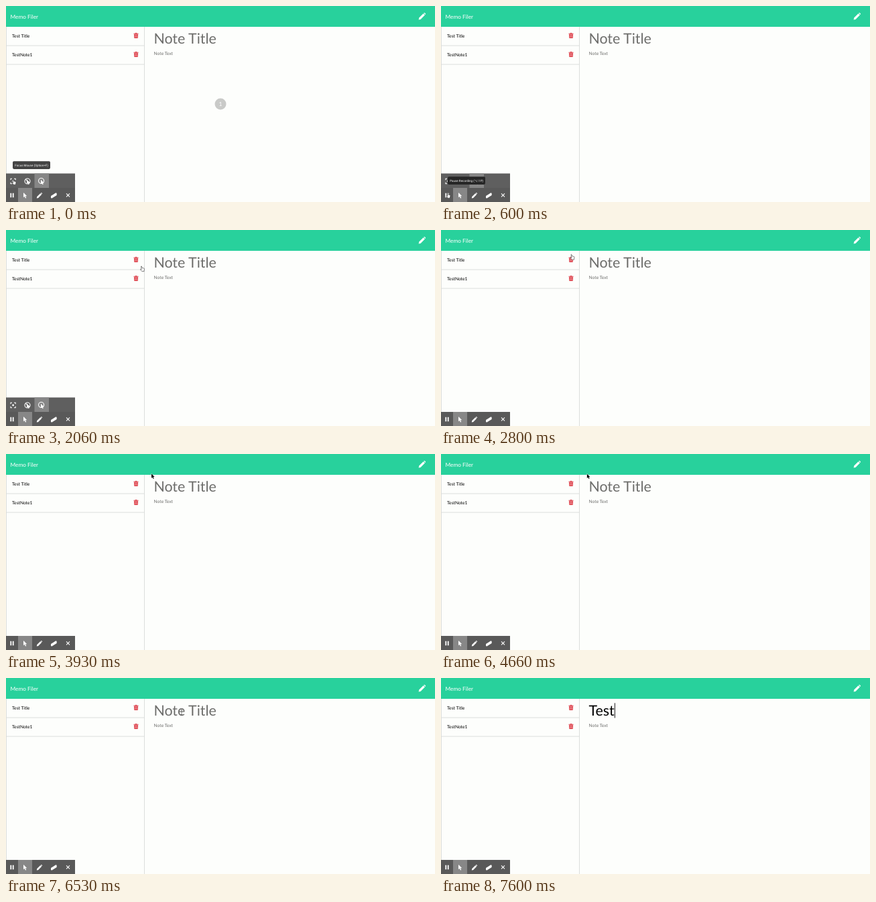
Recreate the animation shown at these times as an HTML page. Size 640 px wide and 292 px high, loop 8 s.

```html
<!DOCTYPE html>
<html lang="en">
<head>
<meta charset="utf-8">
<title>Notes</title>
<style>
  html, body { margin: 0; width: 100%; height: 100%; overflow: hidden; background: #fdfefc; }
  svg { display: block; width: 640px; height: 292px; }
  text { font-family: Lato, sans-serif; font-size: 6.67px; text-rendering: geometricPrecision; white-space: pre; }
  .title { font-size: 21.4px; }
  .hint { fill: #6d6d6b; }
  .tip text { font: 4.5px Roboto, sans-serif; fill: #fff; }
  .line { fill: none; stroke: #fff; stroke-width: 1.1; }
</style>
</head>
<body>
<svg viewBox="0 0 640 292">
  <defs>
    <path id="pencil" d="M0 10.5 .6 7.6 7 1.2 9.3 3.5 2.9 9.9ZM7.6.6 8 .2Q8.6-.2 9.2.3L10.2 1.3Q10.7 1.9 10.2 2.5L9.8 2.9Z"/>
    <path id="arrow" d="M0 0V6.4L1.5 5.1 2.6 7.4 3.7 6.9 2.6 4.6H4.6Z"/>
    <g id="trash" fill="#dc3b45">
      <path d="M0 .8H2L2.4 0H4.6L5 .8H7V1.8H0ZM.4 2.3H6.6L6.2 7.4Q6.1 8 5.5 8H1.5Q.9 8 .8 7.4Z"/>
      <path d="M2.1 3.3V7M3.5 3.3V7M4.9 3.3V7" stroke="#fbd9da" stroke-width=".5"/>
    </g>
  </defs>

  <rect width="640" height="292" fill="#fdfefc"/>
  <path d="M.5 31V292M206.5 31V292M0 59H206M0 87H206" stroke="#dcdedc" fill="none"/>
  <rect width="640" height="31" fill="#28d19c"/>
  <text x="6.5" y="18.7" fill="#fff" style="font-size:8.3px">Memo Filer</text>
  <use href="#pencil" x="615.6" y="10" fill="#fff"/>

  <text x="9" y="47.4">Test Title</text>
  <text x="9" y="75.4">TestNote1</text>
  <use href="#trash" x="190.5" y="40"/>
  <use href="#trash" x="190.5" y="68"/>

  <text id="title" class="title hint" x="220.4" y="56">Note Title</text>
  <text class="hint" x="220.6" y="73.4">Note Text</text>
  <rect id="caret" y="37.3" width=".9" height="22.2"/>

  <g id="count">
    <circle cx="320" cy="146" r="8.5" fill="#c9caC8"/>
    <text x="320" y="149" fill="#fff" text-anchor="middle" style="font-size:8.5px">1</text>
  </g>

  <g id="options">
    <rect y="249.5" width="103" height="22" fill="#5f5f5f"/>
    <rect x="42.5" y="249.5" width="21.5" height="21.5" fill="#868686"/>
    <path class="line" d="M7 259.3V257.3H9M12 257.3H14.2V259.3M14.2 262.7V264.8H12M9 264.8H7V262.7"/>
    <circle cx="10.6" cy="261" r="1.4" fill="#fff"/>
    <circle class="line" cx="32" cy="261" r="4"/>
    <path class="line" d="M29.2 258.2 34.8 263.8"/>
    <use href="#arrow" x="31" y="258.5" fill="#fff"/>
    <circle class="line" cx="52.6" cy="260.5" r="4"/>
    <use href="#arrow" x="52" y="258.8" fill="#fff"/>
  </g>
  <g fill="#fff">
    <rect y="271" width="103" height="21" fill="#595959"/>
    <rect x="18" y="271" width="21" height="21" fill="#878787"/>
    <path d="M6.4 278.8H8.2V285.2H6.4ZM9.8 278.8H11.6V285.2H9.8Z"/>
    <use href="#arrow" transform="translate(26 278) scale(1.15)"/>
    <use href="#pencil" transform="translate(45.8 278) scale(.8)"/>
    <path d="M67 283 74.5 278.3 75.6 279V282L68.3 286.6 67 286Z"/>
    <path class="line" d="M90 279.4 95 284.4M95 279.4 90 284.4"/>
  </g>

  <g id="focusTip" class="tip">
    <rect x="10" y="231.3" width="56" height="11.6" rx="1.8" fill="#434343"/>
    <text x="13.3" y="238.8">Focus Mouse (Option+F)</text>
  </g>
  <g id="pauseTip" class="tip">
    <rect x="10" y="254.3" width="56" height="11.6" rx="1.8" fill="#262626"/>
    <text x="13.3" y="261.8">Pause Recording (⌥⇧P)</text>
  </g>

  <g id="cursor">
    <use id="pointer" href="#arrow" stroke="#fff" stroke-width=".7" paint-order="stroke"/>
    <path id="hand" fill="#fff" stroke="#333" stroke-width=".6" d="M1 .6Q1.6 0 2 .7L2.6 3 5 3.4Q6 3.7 6 4.6L5.5 7V8.2H2.4L.3 5.9Q-.4 5 .2 4.8L1.6 5.4Z"/>
    <path id="beam" fill="none" stroke="#333" stroke-width=".6" d="M-1.5-4Q0-4 0-3V3Q0 4-1.5 4M1.5-4Q0-4 0-3M0 3Q0 4 1.5 4"/>
  </g>
</svg>
<script>
const LOOP = 8000, CLICK = 5630, TYPING = 7060;
const $ = id => document.getElementById(id);
const show = (id, on) => $(id).setAttribute('visibility', on ? 'visible' : 'hidden');

// Mouse stops: time, x, y
const stops = [
  [0, 9, 258], [60, 9, 258], [460, 8, 278], [1200, 8, 278], [1530, 120, 147],
  [1730, 120, 147], [2060, 200.5, 53.5], [2530, 193, 36], [2800, 193, 36],
  [3400, 61, 231], [3600, 61, 231], [3930, 217, 29.5], [4600, 217, 29.5],
  [5400, 267, 37.5], [5460, 267, 37.5], [5800, 262, 51], [LOOP, 262, 51]
];
const keys = [TYPING, 7200, 7400, 7600];

function mouseAt(t) {
  const i = stops.findIndex(s => s[0] > t);
  const [t0, x0, y0] = stops[i - 1], [t1, x1, y1] = stops[i];
  const p = (t - t0) / (t1 - t0), e = p * p * (3 - 2 * p);
  return [x0 + (x1 - x0) * e, y0 + (y1 - y0) * e];
}

function draw(t) {
  const [x, y] = mouseAt(t);
  const beam = t >= CLICK;
  const hand = !beam && (y > 250 || (x < 206 && y > 31 && y < 87));
  $('cursor').setAttribute('transform', `translate(${x} ${y})`);
  show('beam', beam && t < TYPING);
  show('hand', hand);
  show('pointer', !beam && !hand);

  $('count').setAttribute('opacity', Math.max(0, Math.min(1, 1 - (t - 60) / 250)));
  show('focusTip', t < 260);
  show('pauseTip', t >= 460 && t < 860);
  show('options', t < 2800);

  const typed = 'Test'.slice(0, keys.filter(k => t >= k).length);
  const title = $('title');
  title.textContent = typed || 'Note Title';
  title.setAttribute('class', typed ? 'title' : 'title hint');
  $('caret').setAttribute('x', 220.6 + (typed ? title.getComputedTextLength() : 0));
  show('caret', typed || (beam && Math.floor((t - CLICK) / 500) % 2 === 0));
}

function tick() {
  draw(performance.now() % LOOP);
  requestAnimationFrame(tick);
}
tick();
</script>
</body>
</html>
```
